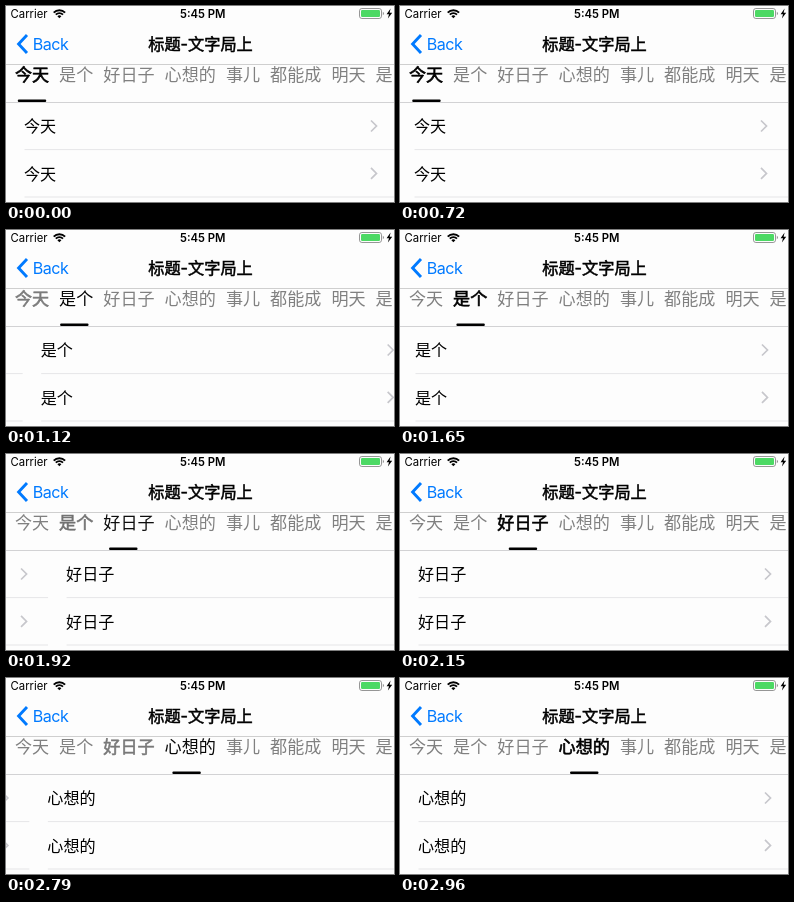
An HTML page for the animation above (3660 ms loop, 388x196 px).

```html
<!DOCTYPE html>
<html lang="zh-CN">
<head>
<meta charset="utf-8">
<title>Tabs</title>
<style>
  html, body { margin: 0; width: 100%; height: 100%; overflow: hidden; background: #fdfdfd; }
  svg { display: block; width: 388px; height: 196px; }
  text { font-family: "Noto Sans CJK SC", "Noto Sans CJK", "Noto Sans", sans-serif; white-space: pre; }
  .latin { font-family: Inter, Roboto, sans-serif; }
  .status { font-size: 11.3px; }
  .back { font-size: 16.1px; letter-spacing: -.55px; fill: #007aff; }
  .title { font-family: Inter, "Noto Sans CJK SC", "Noto Sans CJK", sans-serif; font-size: 16.2px; text-anchor: middle; stroke: #000; stroke-width: .5; }
  .tab { font-size: 17.1px; }
  .cell { font-size: 16.1px; }
  .line { fill: none; stroke: #000; }
  .arrow { fill: none; stroke: #c7c7cc; stroke-width: 1.7; }
</style>
</head>
<body>
<svg viewBox="0 0 388 196">
  <text class="latin status" x="4.6" y="12">Carrier</text>
  <g transform="translate(53.4 12.3)">
    <path class="line" stroke-width="1.9" d="M-5.7-5.7A8 8 0 0 1 5.7-5.7M-3.6-3.6A5.1 5.1 0 0 1 3.6-3.6"/>
    <path d="M0 0L-2-2A2.8 2.8 0 0 1 2-2Z"/>
  </g>
  <text class="latin status" x="196.8" y="12" font-weight="600" text-anchor="middle">5:45 PM</text>
  <rect x="353.5" y="2.5" width="22" height="10" rx="2.4" fill="none" stroke="#969696"/>
  <rect x="355" y="4" width="19" height="7" rx="1.2" fill="#4cd964"/>
  <path d="M376.8 5.8a1.8 1.8 0 0 1 0 3.4z" fill="#969696"/>
  <path d="M384.6 2.6L380.6 8.3H383L381.9 12.6L386.2 6.7H383.6Z"/>
  <path d="M21 29L12.6 38L21 47" fill="none" stroke="#007aff" stroke-width="2.9"/>
  <text class="latin back" x="26.8" y="43.8">Back</text>
  <text class="title" x="194.5" y="44">标题-文字局上</text>
  <rect y="58" width="388" height="1" fill="#cfcfcf"/>
  <g id="tabs"></g>
  <rect y="96" width="388" height="1" fill="#d2d2d4"/>
  <rect id="bar" y="93.5" width="28.4" height="2.6" rx="1"/>
  <g id="pages"></g>
</svg>
<script>
  const LOOP = 3660, PAGE = 392, EM = 17.1, GAP = 10, BAR = 28.4, GREY = 128, ROW = 47.4;
  const names = ["今天", "是个", "好日子", "心想的", "事儿", "都能成", "明天", "是"];

  // mid: halfway time; rise / fall: time constants before and after it
  const swipes = [
    { mid: 958, rise: 52, fall: 52, ticks: [720, 780, 829, 877, 926, 974, 1023, 1071, 1120, 1150, 1210, 1270] },
    { mid: 1838, rise: 38.7, fall: 38.7, ticks: [1650, 1710, 1760, 1810, 1870, 1920, 1970, 2030, 2090, 2150] },
    { mid: 2622, rise: 29.4, fall: 50, ticks: [2480, 2520, 2560, 2600, 2660, 2710, 2760, 2810, 2860, 2910, 2960] }
  ];

  const byId = id => document.getElementById(id);

  function add(parent, tag, attrs, label) {
    const el = document.createElementNS(parent.namespaceURI, tag);
    for (const key in attrs) el.setAttribute(key, attrs[key]);
    if (label) el.textContent = label;
    return parent.appendChild(el);
  }

  let left = 8.9;
  const tabs = names.map(name => {
    const width = name.length * EM;
    const tab = { mid: left + width / 2, el: add(byId("tabs"), "text", { class: "tab", x: left, y: 75 }, name) };
    left += width + GAP;
    return tab;
  });

  names.slice(0, 4).forEach((name, i) => {
    const page = add(byId("pages"), "g", { transform: `translate(${i * PAGE})` });
    for (let row = 0; row < 2; row++) {
      const y = 120 + row * ROW;
      add(page, "text", { class: "cell", x: 18, y: y + 6.1 }, name);
      add(page, "path", { class: "arrow", d: `M365 ${y - 5.5}l5.5 5.5l-5.5 5.5` });
      add(page, "rect", { x: 18.5, y: y + 23.1, width: PAGE - 18.5, height: 1, fill: "#e6e6e8" });
    }
  });

  // Scroll position in pages, and the last settled page
  function scrollAt(time) {
    let settled = 0;
    for (const { mid, rise, fall, ticks } of swipes) {
      if (time < ticks[0]) break;
      if (time < ticks[ticks.length - 1]) {
        const t = ticks.filter(tick => tick <= time).pop() - mid;
        return { pos: settled + 1 / (1 + Math.exp(-t / (t < 0 ? rise : fall))), settled };
      }
      settled++;
    }
    return { pos: settled, settled };
  }

  function draw(time) {
    const { pos, settled } = scrollAt(time);
    const from = Math.floor(pos), part = pos - from;
    const center = tabs[from].mid + part * (tabs[from + 1].mid - tabs[from].mid);
    byId("pages").setAttribute("transform", `translate(${-pos * PAGE})`);
    byId("bar").setAttribute("x", center - BAR / 2);
    tabs.forEach(({ el }, i) => {
      const shade = Math.round(GREY * Math.min(1, Math.abs(i - pos)));
      el.style.fill = el.style.stroke = `rgb(${shade},${shade},${shade})`;
      el.style.strokeWidth = i === settled ? .6 : 0;
    });
  }

  const start = performance.now();
  function loop(now) {
    draw(Math.max(0, now - start) % LOOP);
    requestAnimationFrame(loop);
  }
  draw(0);
  requestAnimationFrame(loop);
</script>
</body>
</html>
```
